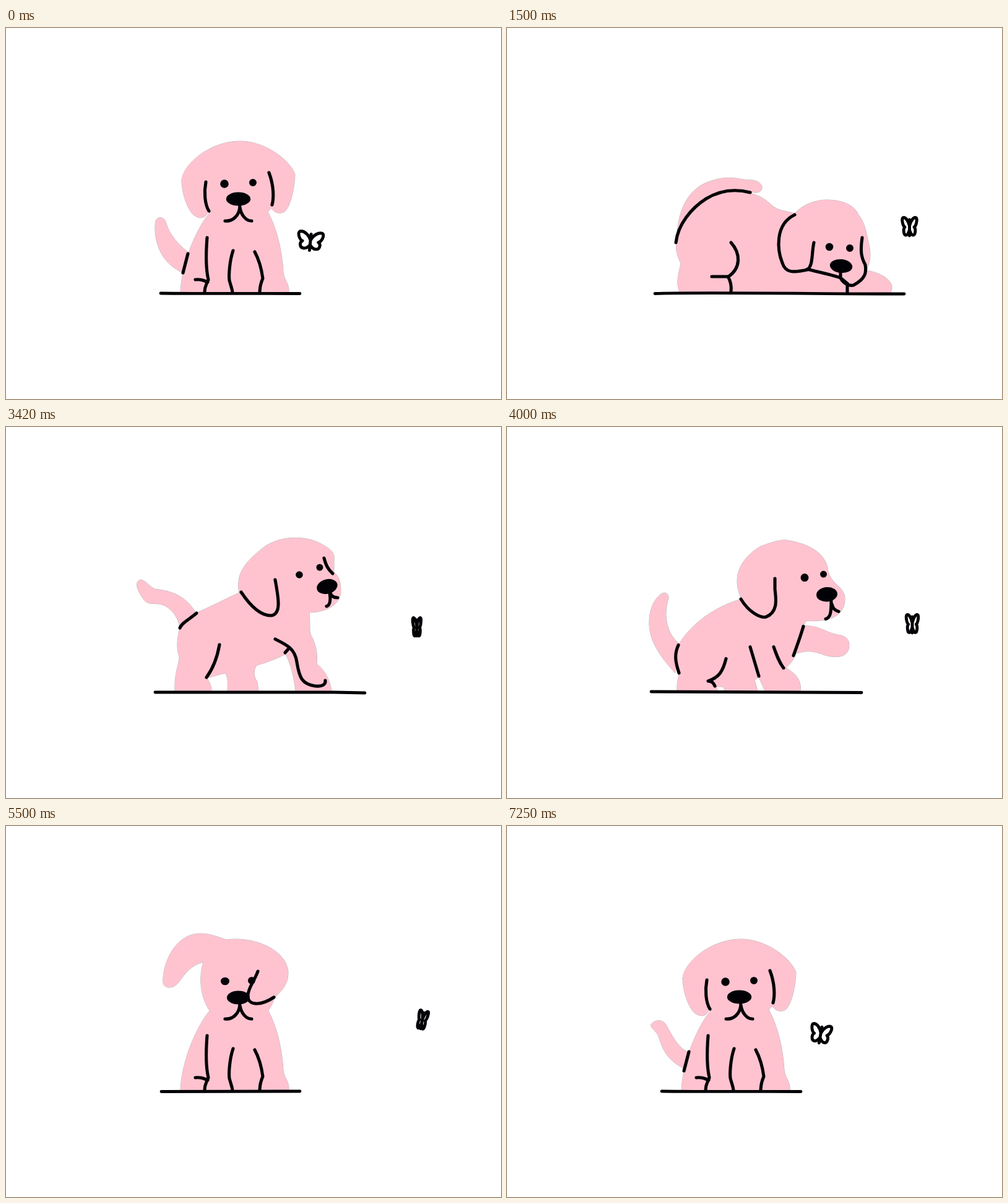
Write an HTML page with a canvas that moves like this. It is 800 px wide and 600 px high and loops after 7330 ms.

```html
<!DOCTYPE html>
<html lang="en">
<head>
<meta charset="utf-8">
<title>Puppy and butterfly</title>
<style>
  html, body { margin: 0; width: 100%; height: 100%; overflow: hidden; background: #fff; }
  canvas { display: block; width: 800px; height: 600px; }
</style>
</head>
<body>
<canvas id="stage" width="800" height="600"></canvas>
<script>
const ctx = document.getElementById('stage').getContext('2d');
const PINK = '#ffc3d0', INK = '#020206';
const LOOP = 7330, FRAMES = 88, GROUND = 428;

const path = d => new Path2D(d);
const wave = (k, k0, period) => Math.sin(2 * Math.PI * (k - k0) / period);
const pulse = (k, k0, period) => Math.sin(Math.PI * (k - k0) / period) ** 2;
// Frames counted from the seam of the loop, so the wag runs through it
const seam = k => (k < 44 ? k : k - FRAMES) + .5;

// Path between two outlines with the same commands
function morph(from, to, u) {
  const ends = to.match(/[\d.]+/g);
  let i = 0;
  return path(from.replace(/[\d.]+/g, n => +n + (ends[i++] - n) * u));
}

// Filled ellipses: [x, y, rx, ry, tilt in degrees]
function dots(list) {
  const p = new Path2D();
  for (const [x, y, rx, ry = rx, tilt = 0] of list) {
    const d = new Path2D();
    d.ellipse(x, y, rx, ry, tilt * Math.PI / 180, 0, 2 * Math.PI);
    p.addPath(d);
  }
  return p;
}

const torso = path('M332 280L330 298C312 318 284 375 282 428L457 428C458 412 450 410 448 395C446 360 438 325 423 297L420 280Z');
const legs = 'M325 339C323 365 323 390 327 407C323 417 321 418 321 427M306 407C314 406 319 408 326 411' +
  'M367 360C361 378 360 400 361 408C363 416 365 420 366 427M402 362C409 375 413 390 415 405C410 417 411 418 410 427';
const muzzle = 'M378 286C378 305 365 313 354 312M378 290C380 303 388 312 397 312';
const tailUp = 'M296 364C280 352 265 335 259 315C256 303 243 304 242 314C241 322 241 331 243 341C248 366 262 385 286 396Z';
const tailOut = 'M296 367C280 362 270 345 258 322C252 311 238 313 233 321C233 327 244 333 246 342C255 372 265 380 288 394Z';

const poses = {
  front: {
    skin: [torso, path('M284 246C286 220 330 183 378 183C420 183 460 215 467 237C466 262 459 290 450 297C444 301 434 300 429 291L423 297C415 312 345 312 330 298L327 295C324 308 313 310 303 302C292 292 284 265 284 246Z')],
    tail: k => morph(tailUp, tailOut, .5 - 2.1 * wave(seam(k), 0, 13)),
    pivot: [290, 380],
    wag: k => -30 * pulse(seam(k), 0, 13),
    lines: path(legs + muzzle + 'M294 365L286 396M323 249C320 265 321 285 328 296M425 234C433 255 433 275 430 286'),
    solid: dots([[353, 252, 6.8], [399, 250, 6], [375.5, 276.5, 19.7, 11]]),
    ground: path('M250 429C330 430 400 429 475 429.5')
  },
  shake: {
    skin: [torso],
    head: {
      skin: path('M319 220C300 224 290 238 281 250C272 264 257 264 254 254C252 225 272 174 314 174C332 174 345 181 357 184C400 178 455 200 456 238C456 258 443 268 434 278C430 290 425 297 423 299C410 312 345 312 330 300C316 280 310 250 319 220Z'),
      lines: path(muzzle + 'M407 235C402 250 391 262 391 274C390 290 410 292 433 277'),
      solid: dots([[354, 251, 7, 6.3], [397, 250, 6], [375.5, 277.5, 18.5, 11]])
    },
    lines: path(legs),
    ground: path('M251 429.5L475 429')
  },
  lie: {
    skin: [path('M279 427C272 412 278 395 281 381C276 370 272 360 274 345C276 318 298 291 322 276C345 262 370 260 388 266C412 271 420 280 432 290C442 296 452 296 465 300C478 285 500 278 516 278C545 278 562 288 568 302C578 315 580 328 583 342C589 365 588 375 581 392C605 396 623 408 622 421L620 428Z')],
    tail: () => path('M275 345C274 300 290 262 325 249C360 236 375 246 395 246C418 248 416 268 400 266C340 255 300 280 275 345Z'),
    pivot: [300, 300],
    wag: k => -10 * pulse(k, 18, 10),
    stretch: k => .015 * pulse(k, 18, 10),
    lines: path('M273 347C276 318 298 291 322 276C345 262 370 260 393 266M362 347C378 365 378 388 358 402M331 402L357 402C362 410 363 418 362 427' +
      'M465 302C432 318 437 360 445 380C450 396 462 396 485 391C495 385 492 365 496 347' +
      'M485 390C505 395 525 399 539 404C543 412 552 418 560 416C580 405 581 395 579 383C572 370 571 360 574 339M539 396L539 404L552 415M550 414L550 428'),
    solid: dots([[521, 354, 6.3], [554, 356, 6], [540, 385, 18.2, 11, 6]]),
    ground: path('M239 429.5C300 427 520 430 642 430')
  },
  side: {
    skin: [path('M283 427C278 400 284 390 286 375C298 352 310 335 325 318C350 302 362 290 376 275C350 280 353 250 358 230C372 190 395 187 415 186C440 182 445 179 458 179C500 182 505 200 517 220C535 232 552 244 552 262C552 280 545 290 534 294C515 300 495 299 477 303C477 320 474 335 474 347C482 372 490 384 502 396C514 404 515 415 515 427L462 427L447 397L441 402L452 427Z')],
    tail: () => path('M318 327C316 300 303 291 285 290C262 290 235 305 224 317C216 328 219 342 224 342C238 343 255 320 272 320C290 323 288 345 285 383Z'),
    pivot: [300, 345],
    wag: k => 14 * wave(k, 31, 10) + (k < 13 ? 35 : 0),
    stretch: k => .038 * pulse(k, 31, 6),
    lines: path('M318 327C304 341 293 361 285 383M380 273C405 268 400 238 435 236M369 360C370 390 357 396 340 398C347 408 350 415 352 428' +
      'M388 358C388 385 394 410 398 428M431 356C432 375 435 388 440 402M472 343C468 357 455 382 447 393'),
    solid: dots([[483.5, 235, 6.4]]),
    nose: path('M512 253C512 242 527 234 535 235C543 239 549 244 549 250C542 259 525 261 516 260C513 259 512 256 512 253Z'),
    ground: path('M232 428C350 430 470 429 570 429.5')
  },
  walk: {
    skin: [path('M273 427C272 395 280 385 280 372C274 355 278 335 282 322C288 314 298 306 307 301C330 291 355 278 377 268C370 235 390 215 420 192C450 174 485 178 503 186C522 195 532 202 530 215L530 235C540 243 541 255 541 265C541 285 522 299 490 300C492 330 490 325 492 335C503 355 503 370 502 383C515 393 524 410 526 427L468 427C466 405 460 383 452 367C435 376 420 381 406 385C400 390 399 403 406 412L408 427L358 427C360 405 355 400 355 398C345 400 335 403 325 406C330 415 332 420 332 427Z')],
    tail: () => path('M307 301C292 275 270 265 240 262C228 255 222 244 215 248C208 253 213 265 220 275C227 288 236 285 247 286C265 289 277 305 281 323Z'),
    pivot: [294, 312],
    wag: k => 9 * wave(k, 41, 9),
    stretch: k => .014 * pulse(k, 41, 4),
    lines: path('M281 325C284 317 295 312 308 301M380 267C390 282 408 305 428 305C446 303 440 275 435 247M345 352C341 375 335 390 324 405' +
      'M435 343C453 352 467 358 470 380C474 405 478 416 500 419C512 420 517 416 516 410M458 357L451 365' +
      'M514 212C517 223 520 230 528 237M523 268C525 280 524 288 518 290M525 270C527 275 531 276 536 276'),
    solid: dots([[474, 239, 5.8], [507, 227, 5.5], [519, 258, 17, 11.7, -15]]),
    ground: path('M241 429L530 429L580 430')
  },
  swat: {
    skin: [path('M275 427C274 410 279 402 278 396C270 375 272 365 277 353C300 315 340 290 379 279C363 245 375 215 410 194C430 187 440 184 450 184C490 190 512 205 518 228C520 255 546 258 546 278C546 305 525 316 483 314L479 323L465 370C462 380 455 385 451 390C468 400 476 410 474 427L417 427L407 405L400 409L405 427L352 427L350 420L338 420L341 427Z')],
    tail: () => path('M277 353C250 345 235 315 237 284C233 274 225 277 220 287C210 305 213 335 230 358C245 377 262 388 277 398Z'),
    pivot: [277, 375],
    wag: k => -18 * wave(k, 55, 20),
    paw: path('M479 321C500 317 515 328 532 328C550 328 554 337 553 349C550 366 525 366 510 362C490 358 480 362 464 370Z'),
    pawPivot: [472, 347],
    swing: k => 11 * wave(k, 55, 8),
    stretch: k => .02 * pulse(k, 55, 6),
    lines: path('M277 353C270 368 272 380 278 398M378 279C392 302 410 309 418 308C440 300 434 275 433 263L433 246' +
      'M354 375C349 395 343 405 325 411C332 411 334 415 336 419M393 356L407 403M431 356C436 370 440 381 447 390' +
      'M479 323C474 340 469 353 463 370M524 282C524 300 523 309 515 311M525 287C527 295 530 297 536 299'),
    solid: dots([[481, 244.5, 6.5], [511.5, 239, 5.5], [517, 271.5, 17, 11.7, -5]]),
    ground: path('M233 428L573 429.5')
  }
};

// First frame of each pose
const schedule = [
  [0, 'front'], [8, 'side'], [13, 'lie'], [28, 'side'], [37, 'walk'],
  [45, 'swat'], [61, 'shake'], [70, 'front']
];

// Butterfly: [frame, x, y, wing spread, tilt]
const flight = [
  [0, 492, 344.5, .92, .1], [8, 494, 338, .85, 0], [13, 640, 310, .65, .1],
  [18, 650.5, 321, .54, 0], [24, 644, 317, .45, 0], [31, 645.5, 309, .5, -.1],
  [41, 664, 323, .31, 0], [48, 655, 318, .45, 0], [55, 652, 306.5, .36, .1],
  [63, 674, 314, .4, .1], [66, 673, 313, .34, .22], [72, 604, 318, .75, .2],
  [81, 563, 325, .75, .15], [87, 507, 336, .74, .18], [88, 492, 344.5, .92, .1]
];

function moved(shape, matrix) {
  const p = new Path2D();
  p.addPath(shape, matrix);
  return p;
}

const turn = ([x, y], deg) => new DOMMatrix().translate(x, y).rotate(deg).translate(-x, -y);

function paintSkin(shapes) {
  ctx.strokeStyle = '#8c8c8c';
  ctx.lineWidth = .7;
  shapes.forEach(s => ctx.stroke(s));
  ctx.fillStyle = PINK;
  shapes.forEach(s => ctx.fill(s));
}

function paintInk({ lines, solid, nose }) {
  ctx.strokeStyle = ctx.fillStyle = INK;
  ctx.lineWidth = 5.1;
  ctx.stroke(lines);
  if (solid) ctx.fill(solid);
  if (nose) ctx.fill(nose);
}

function drawDog(k) {
  const pose = poses[schedule.findLast(s => s[0] <= k)[1]];
  const { head, tail, paw } = pose;
  // The ears fly to one side, then to the other
  const flipped = Math.floor((k - 61) / 2) % 2;
  const side = new DOMMatrix(flipped ? [-1, 0, 0, 1, 752, 0] : [1, 0, 0, 1, 0, 0]);
  const skin = [...pose.skin];
  if (tail) skin.unshift(moved(tail(k), turn(pose.pivot, pose.wag(k))));
  if (paw) skin.push(moved(paw, turn(pose.pawPivot, pose.swing(k))));
  if (head) skin.push(moved(head.skin, side));

  ctx.save();
  ctx.translate(0, GROUND);
  ctx.scale(1, 1 + (pose.stretch ? pose.stretch(k) : 0));
  ctx.translate(0, -GROUND);
  paintSkin(skin);
  paintInk(pose);
  if (head) paintInk({ lines: moved(head.lines, side), solid: moved(head.solid, side) });
  ctx.restore();
  ctx.lineWidth = 4.8;
  ctx.strokeStyle = INK;
  ctx.stroke(pose.ground);
}

function drawButterfly(k) {
  const i = flight.findLastIndex(f => f[0] <= k);
  const a = flight[i], b = flight[i + 1];
  const span = b[0] - a[0], u = (k - a[0]) / span;
  const [, x, y, spread, tilt] = a.map((v, j) => v + (b[j] - v) * u);
  const beat = Math.sin(Math.PI * u * Math.round(span / 3));
  const w = Math.min(1, spread + .2 * beat * beat);
  const low = 12 + 4 * (1 - w);

  ctx.save();
  ctx.translate(x, y + 3 * beat);
  ctx.rotate(tilt);
  ctx.beginPath();
  for (const side of [-w, w]) {
    ctx.save();
    ctx.scale(side, 1);
    ctx.moveTo(0, -1);
    ctx.bezierCurveTo(4, -10, 13, -16, 20, -14);
    ctx.bezierCurveTo(24, -11, 20, -1, 14, 1);
    ctx.bezierCurveTo(20, 4, 17, low, 12, low);
    ctx.bezierCurveTo(7, low + 1, 3, 10, 0, 6);
    ctx.restore();
  }
  ctx.moveTo(0, -11);
  ctx.lineTo(0, 15);
  ctx.lineWidth = 4.9;
  ctx.strokeStyle = INK;
  ctx.stroke();
  ctx.restore();
}

const start = performance.now();
function tick() {
  const t = (performance.now() - start) % LOOP;
  // Twelve drawings a second, on a 10 ms grid
  const k = Math.min(FRAMES - 1, Math.ceil(3 * (Math.floor(t / 10) + 1) / 25) - 1);
  ctx.fillStyle = '#fff';
  ctx.fillRect(0, 0, 800, 600);
  ctx.lineCap = ctx.lineJoin = 'round';
  drawDog(k);
  drawButterfly(k);
  requestAnimationFrame(tick);
}
tick();
</script>
</body>
</html>
```
